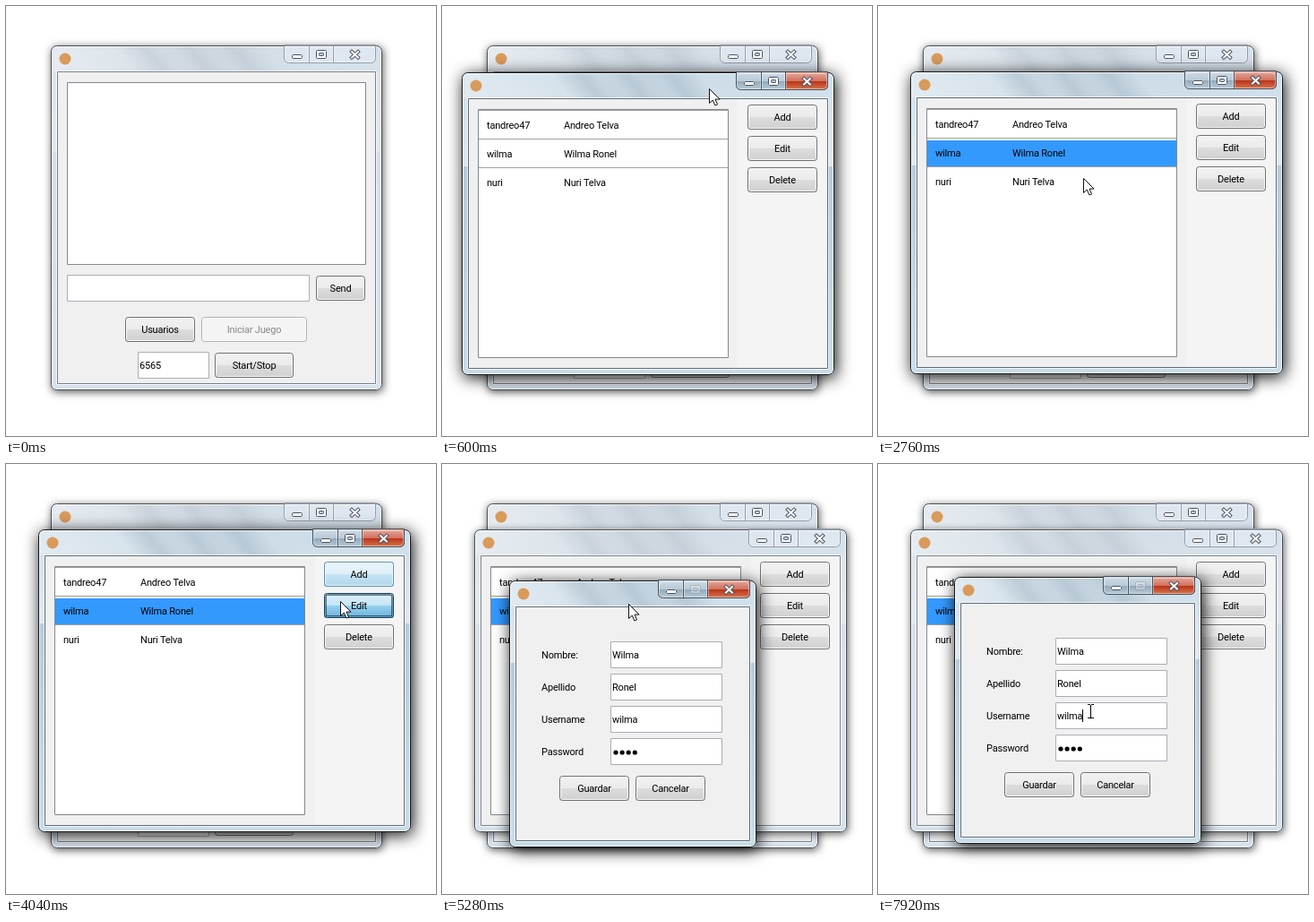
An HTML page with a canvas that plays this animation: 480x480 px, repeating every 8000 ms.

```html
<!DOCTYPE html>
<html lang="es">
<head>
<meta charset="utf-8">
<title>Usuarios</title>
<style>
html, body { margin: 0; width: 100%; height: 100%; overflow: hidden; background: #fff; }
canvas { display: block; width: 480px; height: 480px; }
</style>
</head>
<body>
<canvas id="stage" width="480" height="480"></canvas>
<script>
const c = document.getElementById('stage').getContext('2d');
const LOOP = 8000, STEP = 40;
const FONT = '11px Roboto, "Noto Sans", sans-serif';
const USERS = [['tandreo47', 'Andreo Telva'], ['wilma', 'Wilma Ronel'], ['nuri', 'Nuri Telva']];
const FIELDS = [['Nombre:', 'Wilma'], ['Apellido', 'Ronel'], ['Username', 'wilma'], ['Password', '']];
const LIST = { w: 416, h: 338, open: 200, drag: [400, 1000], grab: [276, 18] };
const EDIT = { w: 276, h: 298, open: 4600, drag: [4960, 5560], grab: [133, 26] };
const ROW_CLICKS = [2280, 2880, 3400], EDIT_CLICK = 4040, FIELD_CLICK = 6640;

// Where the pointer comes to rest: [time, x, y]
const STOPS = [
  [280, 482, 110], [400, 276, 18], [600, 298, 92], [1000, 312, 91], [1240, 283, 149],
  [1640, 368, 122], [2160, 235, 166], [2640, 229, 192], [3320, 235, 166], [3880, 372, 126],
  [4040, 373, 153], [4960, 133, 144], [5280, 208, 156], [5560, 218, 152],
  [6080, 226, 210], [6480, 235, 279], [6920, 245, 251], [7120, 238, 276]
];

const clamp = (v, lo = 0, hi = 1) => Math.max(lo, Math.min(hi, v));

// Each move takes a time that grows with its length
function pointerAt(t) {
  let i = STOPS.findIndex(s => t < s[0]);
  if (i < 0) i = STOPS.length;
  const [t0, x0, y0] = STOPS[Math.max(0, i - 1)];
  if (i < 1 || i === STOPS.length) return [x0, y0];
  const [t1, x1, y1] = STOPS[i];
  const span = Math.min(t1 - t0, Math.max(200, 3 * Math.hypot(x1 - x0, y1 - y0)));
  const p = clamp(1 - (t1 - t) / span), e = p * p * (3 - 2 * p);
  return [Math.round(x0 + (x1 - x0) * e), Math.round(y0 + (y1 - y0) * e)];
}

// A dragged window hangs on the pointer
function place(win, t) {
  const [x, y] = pointerAt(clamp(t, ...win.drag));
  return [x - win.grab[0], y - win.grab[1]];
}

// Full under the pointer, then a slow fade
function glow(t, x, y, w, h) {
  let level = 0;
  for (let k = 0; k < 12; k++) {
    const [px, py] = pointerAt(t - k * STEP);
    if (px >= x && px < x + w && py >= y && py < y + h) level = Math.max(level, 1 - k / 12);
  }
  return level;
}

function path(x, y, w, h, r) {
  c.beginPath();
  c.roundRect(x, y, w, h, r);
}

function ring(x, y, w, h, r, color) {
  path(x + .5, y + .5, w - 1, h - 1, r);
  c.strokeStyle = color;
  c.lineWidth = 1;
  c.stroke();
}

function rect(x, y, w, h, fill, line) {
  c.fillStyle = fill;
  c.fillRect(x, y, w, h);
  if (line) ring(x, y, w, h, 0, line);
}

function ramp(x0, y0, x1, y1, stops) {
  const g = c.createLinearGradient(x0, y0, x1, y1);
  stops.forEach(([p, color]) => g.addColorStop(p, color));
  return g;
}

// Glossy fill with a hard step at share p
function gloss(y, h, p, [a, b, d, e]) {
  return ramp(0, y, 0, y + h, [[0, a], [p, b], [p, d], [1, e]]);
}

function text(s, x, mid, color = '#000', align = 'left') {
  c.font = FONT;
  c.letterSpacing = '-0.2px';
  c.textAlign = align;
  c.fillStyle = color;
  c.fillText(s, x, mid + 4);
}

const SKIN = {
  plain: [['#f2f2f2', '#ebebeb', '#dddddd', '#cfcfcf'], '#707070', '#f8f8f8'],
  off: [['#f4f4f4', '#f4f4f4', '#f4f4f4', '#f4f4f4'], '#adb2b5', '#fafafa'],
  hot: [['#eaf6fd', '#d9f0fc', '#bee6fd', '#a7d9f5'], '#3c7fb1', '#f3fbff'],
  down: [['#e0f1fb', '#c4e5f6', '#98d1ef', '#68b3db'], '#1d3f58', '#5f9dbf']
};

function button(label, x, y, w, { skin = 'plain', lit = 0, litSkin = 'hot', focus } = {}) {
  const h = 28;
  const layer = ([fill, line, inner]) => {
    path(x, y, w, h, 3);
    c.fillStyle = gloss(y, h, .5, fill);
    c.fill();
    ring(x + 1, y + 1, w - 2, h - 2, 2, inner);
    ring(x, y, w, h, 3, line);
  };
  layer(SKIN[skin]);
  if (lit) {
    c.save();
    c.globalAlpha *= lit;
    layer(SKIN[litSkin]);
    c.restore();
  }
  if (focus) {
    c.setLineDash([1, 1]);
    ring(x + 2, y + 2, w - 4, h - 4, 0, '#000');
    c.setLineDash([]);
  }
  text(label, x + w / 2, y + 14, skin === 'off' ? '#888' : '#000', 'center');
}

function captions(x, y, on, fixed) {
  const w = 103, h = 20, dark = '#4b525d', edge = on ? '#46525d' : '#8f9aa5';
  c.save();
  path(x, y, w, h, [0, 0, 5, 5]);
  c.clip();
  rect(x, y, w, h, on ? gloss(y, h, .5, ['#cfdbe5', '#b9c9d7', '#93a9bb', '#b9cddc']) : 'rgba(233,239,246,.45)');
  if (on) rect(x + 55, y, 48, h, gloss(y, h, .5, ['#e6a99c', '#d0705e', '#b83219', '#dc7a50']));
  ring(x + 1, y + 1, w - 2, h - 2, 4, 'rgba(255,255,255,.45)');
  [28, 55].forEach(d => {
    rect(x + d - 1, y + 1, 3, h - 2, 'rgba(255,255,255,.4)');
    rect(x + d, y, 1, h, edge);
  });
  c.restore();
  ring(x, y - 1, w, h + 1, [0, 0, 5, 5], edge);

  const box = (bx, by, bw, bh, fill = '#fff') => {
    path(bx, by, bw, bh, 1);
    c.fillStyle = fill;
    c.fill();
    ring(bx, by, bw, bh, 1, dark);
  };
  box(x + 9, y + 10, 12, 5);
  c.save();
  if (fixed) c.globalAlpha *= .3;
  box(x + 36, y + 5, 12, 10);
  box(x + 39, y + 8, 6, 4, '#b9c9d7');
  c.restore();
  c.lineCap = 'square';
  [[4, dark], [2, '#fff']].forEach(([lw, color]) => {
    c.beginPath();
    [-1, 1].forEach(s => {
      c.moveTo(x + 79.5 - 3.5 * s, y + 7);
      c.lineTo(x + 79.5 + 3.5 * s, y + 13.5);
    });
    c.lineWidth = lw;
    c.strokeStyle = color;
    c.stroke();
  });
  c.lineCap = 'butt';
}

function frame(x, y, w, h, on, fixed) {
  c.save();
  c.shadowColor = on ? 'rgba(0,0,0,.95)' : 'rgba(0,0,0,.65)';
  c.shadowBlur = on ? 18 : 10;
  c.shadowOffsetX = on ? 2 : 1;
  c.shadowOffsetY = on ? 3 : 2;
  path(x, y, w, h, 6);
  c.fillStyle = '#dce6ee';
  c.fill();
  c.restore();

  c.save();
  path(x, y, w, h, 6);
  c.clip();
  rect(x, y, w, h, gloss(y, h, .31, on
    ? ['#cddeea', '#dfeaf1', '#b5cbdb', '#c9dce9']
    : ['#dbe2e9', '#e1e9f0', '#d5e0ea', '#d6e1eb']));
  rect(x, y, w, 29, ramp(x, 0, x + w, 0, [[0, 'rgba(236,241,245,.6)'], [.5, 'rgba(205,216,225,.5)'], [1, 'rgba(205,223,236,.4)']]));
  // Slanted reflections, fixed to the screen
  for (let i = 0; i < 3; i++) {
    const left = 120 + i * 50, tone = on ? '130,155,175' : '165,175,187';
    const soft = `rgba(${tone},0)`;
    rect(x, y, w, 29, ramp(left, y, left + 40, y - 32, [[0, soft], [.5, `rgba(${tone},.3)`], [1, soft]]));
  }
  c.restore();
  ring(x + 1, y + 1, w - 2, h - 2, 5, 'rgba(255,255,255,.8)');
  ring(x, y, w, h, 6, on ? '#14191d' : '#464d54');
  ring(x + 6, y + 28, w - 12, h - 34, 1, 'rgba(255,255,255,.75)');
  rect(x + 7, y + 29, w - 14, h - 36, '#f0f0f0', on ? '#5d6b78' : '#77828d');
  captions(x + w - 110, y, on, fixed);
  c.beginPath();
  c.arc(x + 16, y + 15, 6.5, 0, 7);
  c.fillStyle = '#d99a5b';
  c.fill();
}

const input = (x, y, w) => rect(x, y, w, 30, '#fff', '#abadb3');

function mainWindow() {
  frame(50, 44, 370, 385, false);
  rect(68, 85, 334, 204, '#fff', '#828790');
  input(68, 300, 271);
  button('Send', 346, 301, 55);
  button('Usuarios', 133, 347, 78);
  button('Iniciar Juego', 218, 347, 118, { skin: 'off' });
  input(147, 386, 80);
  text('6565', 149, 401);
  button('Start/Stop', 233, 387, 88);
}

function pickedRow(t, y) {
  const click = ROW_CLICKS.filter(k => k <= t).pop();
  return click ? Math.floor((pointerAt(click)[1] - y - 43) / 32) : -1;
}

function listWindow(x, y, t) {
  frame(x, y, LIST.w, LIST.h, t < EDIT.open);
  rect(x + 308, y + 30, 100, 300, '#f4f4f4');
  rect(x + 18, y + 41, 280, 278, '#fff', '#828790');
  rect(x + 19, y + 42, 278, 1, '#a0a0a0');
  const picked = pickedRow(t, y);
  USERS.forEach(([user, name], i) => {
    const top = y + 43 + i * 32;
    if (i === picked) rect(x + 19, top + 2, 278, 30, '#3399ff');
    if (i < 2) rect(x + 19, top + 31, 278, 1, '#a0a0a0');
    text(user, x + 28, top + 16);
    text(name, x + 114, top + 16);
  });
  ['Add', 'Edit', 'Delete'].forEach((label, i) => {
    const bx = x + 319, by = y + 36 + i * 35, pressed = i === 1 && t >= EDIT_CLICK;
    button(label, bx, by, 78, {
      lit: t > LIST.drag[1] ? glow(t, bx, by, 78, 28) : 0,
      litSkin: pressed ? 'down' : 'hot',
      focus: pressed && t < EDIT.open
    });
  });
}

function editWindow(x, y, t) {
  frame(x, y, EDIT.w, EDIT.h, true, true);
  const caret = t >= FIELD_CLICK && Math.floor((t - FIELD_CLICK) / 320) % 2 === 0;
  FIELDS.forEach(([label, value], i) => {
    const top = y + 68 + i * 36;
    text(label, x + 36, top + 15);
    input(x + 113, top, 125);
    text(value, x + 115, top + 15);
    if (i === 2 && caret) rect(x + 115 + Math.round(c.measureText(value).width), top + 8, 1, 14, '#000');
  });
  c.fillStyle = '#000';
  for (let i = 0; i < 4; i++) {
    c.beginPath();
    c.arc(x + 119 + i * 7.1, y + 192, 2.6, 0, 7);
    c.fill();
  }
  button('Guardar', x + 56, y + 218, 78);
  button('Cancelar', x + 141, y + 218, 78);
}

// Windows fade and grow in
function show(win, t, draw) {
  if (t < win.open) return;
  const [x, y] = place(win, t);
  const p = clamp((t - win.open + STEP) / 200), s = .9 + .1 * p;
  c.save();
  c.globalAlpha = p;
  c.translate(x + win.w / 2 * (1 - s), y + win.h / 2 * (1 - s));
  c.scale(s, s);
  draw(0, 0, t);
  c.restore();
}

function pointer(t) {
  if (t < STOPS[0][0]) return;
  const [x, y] = pointerAt(t), [ex, ey] = place(EDIT, t);
  const col = x - ex - 113, row = y - ey - 68;
  if (t > EDIT.open && col > 0 && col < 125 && row >= 0 && row < 144 && row % 36 < 30) {
    rect(x - 1, y - 7, 1, 15, '#000');
    [-8, 7].forEach(d => [-4, 0].forEach(e => rect(x + e, y + d, 3, 1, '#000')));
    return;
  }
  c.beginPath();
  [[0, 0], [0, 16], [3.8, 12.6], [6.4, 18.5], [9, 17.4], [6.5, 11.6], [11.6, 11.6]]
    .forEach(([dx, dy]) => c.lineTo(x + .5 + dx, y + .5 + dy));
  c.closePath();
  c.fillStyle = '#fff';
  c.fill();
  c.strokeStyle = '#111';
  c.lineWidth = 1;
  c.stroke();
}

function draw(t) {
  rect(0, 0, 480, 480, '#fff');
  mainWindow();
  show(LIST, t, () => {
    const [x, y] = place(LIST, t);
    c.translate(-x, -y);
    listWindow(x, y, t);
  });
  show(EDIT, t, () => {
    const [x, y] = place(EDIT, t);
    c.translate(-x, -y);
    editWindow(x, y, t);
  });
  pointer(t);
}

const start = performance.now();
function tick() {
  const t = (performance.now() - start) % LOOP;
  draw(Math.floor(t / STEP) * STEP);
  requestAnimationFrame(tick);
}
tick();
</script>
</body>
</html>
```
